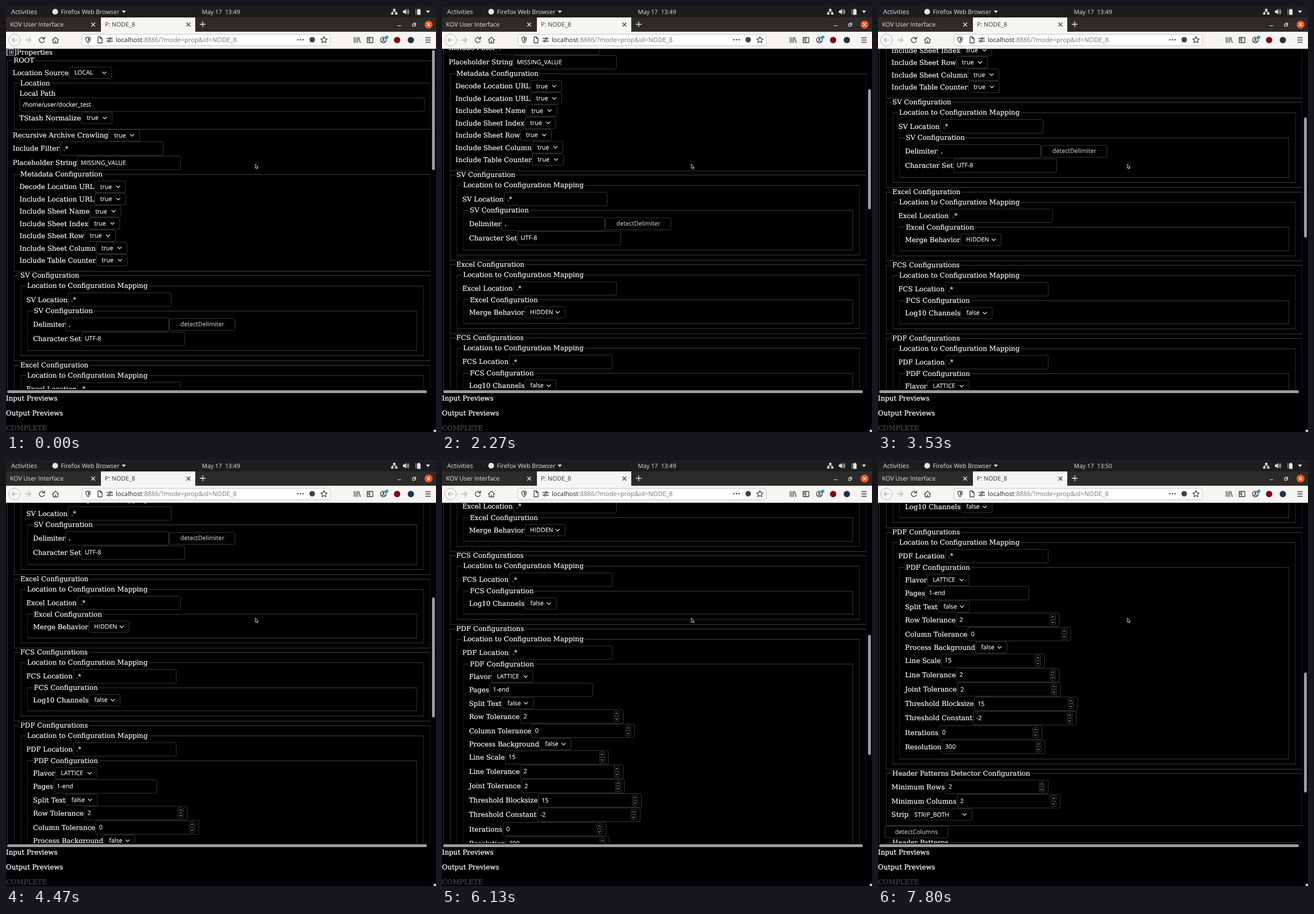
Recreate the animation shown at these times as an HTML page. Size 752 by 745 pixels, loop 8000 ms.

```html
<!DOCTYPE html>
<html lang="en">
<head>
<meta charset="utf-8">
<title>Properties</title>
<style>
  html, body { margin: 0; width: 100%; height: 100%; overflow: hidden; background: #000; }
  #stage { position: relative; width: 752px; height: 745px; overflow: hidden; background: #000;
    color: #fff; font: 11.81px/20px "DejaVu Serif", serif; text-rendering: geometricPrecision; white-space: pre;
    -webkit-text-stroke: .25px; }
  #stage > * { position: absolute; }
  #chrome { left: 0; top: 0; font: 10.65px "Open Sans", sans-serif; }
  #panel { left: 0; top: 75px; width: 752px; height: 595px; overflow: hidden; }
  #page { position: absolute; left: 0; top: -.6px; width: 752px; height: 1600px; will-change: transform; }
  /* The form is laid out at its natural 16px size and shown reduced. */
  #form { width: 1005px; transform: scale(.738); transform-origin: 0 0; font-size: 16px; line-height: 19px; }
  #form * { box-sizing: border-box; }
  fieldset { margin: 0 2px; padding: 5.85px 12px 10px; border: 2px groove #555; }
  legend { padding: 0 2px; }
  .row { display: flex; align-items: center; height: 19px; }
  .row.select { height: 29px; }
  .row.input, .row.number { height: 34px; }
  .row.button { height: 30px; }
  .control { position: relative; display: flex; align-items: center; flex: none; border: 1px solid #4c4c4c;
    border-radius: 4px; background: #000; color: #eee; font: 14.4px "Open Sans", sans-serif; }
  .row > :not(:first-child).control { margin-left: 1px; }
  .control.input, .control.number { height: 33px; padding-left: 7px; }
  .control.select { height: 28px; padding-left: 12px; }
  .control.button { height: 29px; justify-content: center; color: #bbb; }
  .control svg { position: absolute; }
  .select svg { right: 11px; top: 9px; }
  .number svg { right: 7px; top: 2px; }
  .bar { background: #9b9b9b; border-radius: 3px; }
  .tofu { display: inline-block; width: 11px; height: 15px; margin: 0 1px; border: 1px solid #ddd;
    vertical-align: -2px; background: radial-gradient(#999 35%, #222 40%); }
</style>
</head>
<body>
<div id="stage">
  <div id="panel"><div id="page"><div id="form"></div></div></div>
  <div class="bar" id="thumb" style="left:745px;top:77px;width:5px;height:210px"></div>
  <div class="bar" style="left:2px;top:672px;width:734px;height:5px"></div>
  <div style="left:0;top:676px">Input Previews</div>
  <div style="left:0;top:702px">Output Previews</div>
  <div style="left:0;top:728px;color:#434a49">COMPLETE</div>
  <div style="left:748px;top:741px;width:4px;height:4px;background:#ccc"></div>

  <svg id="chrome" width="752" height="75" fill="none" stroke-linecap="round" stroke-linejoin="round">
    <rect width="752" height="20" fill="#1d1d1d"/>
    <rect y="20" width="752" height="26" fill="#2d2a2a"/>
    <rect x="166" y="20" width="165" height="26" fill="#f6f5f4"/>
    <rect y="45" width="752" height="29.5" fill="#f6f5f4"/>
    <rect y="74" width="752" height="1" fill="#c4c2c0"/>

    <g fill="#e6e6e6">
      <text x="9" y="13.8" font-size="11">Activities</text>
      <circle cx="86" cy="10" r="5"/>
      <text x="96" y="13.8">Firefox Web Browser</text>
      <path d="M202.500 8h7l-3.500 4.500zM734.500 8h7l-3.500 4.500z"/>
      <g text-anchor="middle" font-size="10.4">
        <text id="before" x="376" y="13.8">May 17&#160; 13:49</text>
        <text id="after" x="376" y="13.8" opacity="0">May 17&#160; 13:50</text>
      </g>
      <path d="M677 5h4v3.500h-4zM673.500 11.500h4v3.500h-4zM680.500 11.500h4v3.500h-4z"/>
      <path d="M694 8h2.500l3-3v10l-3-3H694z"/>
      <path d="M719 6.500h1.500V5h3v1.500h1.500v9h-6z"/>
      <text x="7" y="36.300">KOV User Interface</text>
    </g>
    <g stroke="#e6e6e6" stroke-width="1.100">
      <path d="M679 8v2M675.500 11.500V10h7v1.500M701 7.500q2 2.500 0 5M703 6q3 4 0 8"/>
      <path d="M717 6v9" stroke-width=".8"/>
      <path d="M149.500 29.500l6 6m0-6l-6 6M339.500 32h9m-4.500-4.500v9" stroke-width="1.300"/>
      <path d="M685.500 34.500h5M711 31.500h4v4h-4zM712.500 30h4v4"/>
    </g>
    <text x="173" y="36.300" fill="#333">P: NODE_8</text>
    <path d="M316 29.500l6 6m0-6l-6 6" stroke="#444" stroke-width="1.300"/>
    <circle cx="739" cy="32.500" r="7" fill="#e95420"/>
    <path d="M736.500 30l5 5m0-5l-5 5" stroke="#fff" stroke-width="1.200"/>

    <g stroke="#b5b3b1" stroke-width="1.300">
      <circle cx="15" cy="59.500" r="10" fill="#fafafa" stroke-width="1"/>
      <path d="M19.500 59.500h-9m4-4l-4 4 4 4M34.500 59.500h9m-4-4l4 4-4 4"/>
    </g>
    <rect x="133" y="49.500" width="434" height="20" rx="3" fill="#fff" stroke="#c9c6c3"/>
    <g stroke="#444" stroke-width="1.300">
      <path d="M66.500 57a4.500 4.500 0 1 0 .5 4M67.500 54v3.500H64"/>
      <path d="M81 59.500l5.500-5 5.500 5M82.500 59.500v5h8v-5M86.500 64v-3"/>
      <path d="M139.500 55.500q2.500 0 4-1.500 1.500 1.500 4 1.500 0 6.500-4 9-4-2.500-4-9z"/>
      <path d="M143.500 56.500v5.500q2-1.500 2-5z" fill="#444" stroke-width=".6"/>
      <path d="M161 54h4l3 3v7.500h-7zM165 54v3h3"/>
      <path d="M176 57h4.500M184 57h2.500M176 61.500h2M182 61.500h4.500"/>
      <circle cx="182.300" cy="57" r="1.500"/><circle cx="180" cy="61.500" r="1.500"/>
      <path d="M556 53.500l1.700 3.700 4 .4-3 2.700.9 4-3.600-2.100-3.600 2.100.9-4-3-2.700 4-.4z"/>
      <path d="M609 55v9M612 55v9M615 55v9M617 55l2.500 9"/>
      <path d="M631.500 55h10v9h-10zM636 55v9M633 57.500h1.500M633 60h1.500"/>
      <circle cx="660" cy="59.500" r="5"/>
      <path d="M657 62.500q3-3 6 0" stroke-width="1.600"/>
      <path d="M734 55.500h8M734 59.500h8M734 63.500h8"/>
    </g>
    <g fill="#444">
      <circle cx="510.500" cy="59" r="1.300"/><circle cx="515" cy="59" r="1.300"/><circle cx="519.500" cy="59" r="1.300"/>
      <circle cx="535.500" cy="59" r="4.800"/>
      <circle cx="660" cy="58" r="1.800"/>
    </g>
    <circle cx="666" cy="54.500" r="2.700" fill="#1a9be6"/>
    <circle cx="684" cy="59.500" r="5.500" fill="#800010"/>
    <circle cx="708" cy="59.500" r="5.500" fill="#24313d"/>
    <text x="192" y="63.200" font-size="11.100" fill="#777"><tspan fill="#1c1c1c">localhost</tspan>:8886/?mode=prop&amp;id=NODE_8</text>
  </svg>

  <svg style="left:434px;top:275px" width="8" height="12">
    <path d="M2 1.500v7.500l1.800-1.600 1.200 2.400 1.200-.6-1.100-2.300h2z" fill="#000" stroke="#ddd" stroke-width=".9"/>
  </svg>
</div>

<script>
const $ = id => document.getElementById(id);

const chevron = `<svg width="12" height="9" viewBox="0 0 9 6.500"><path d="M1 1l3.500 3.500 3.500-3.500" fill="none" stroke="#ddd" stroke-width="1.300"/></svg>`;
const spinner = `<svg width="15" height="27" viewBox="0 0 11 20" fill="none" stroke="#444">
  <rect x=".5" y=".5" width="9.500" height="9" rx="3"/><rect x=".5" y="10" width="9.500" height="9" rx="3"/>
  <path d="M3 6l2.200-2.200 2.200 2.200M3 13.500l2.200 2.200 2.200-2.200" stroke="#ddd"/></svg>`;

function control(kind, value, width) {
  const extra = { select: chevron, number: spinner }[kind] || '';
  return `<span class="control ${kind}" style="width:${width}px">${value}${extra}</span>`;
}

const row = (kind, ...parts) => `<div class="row ${kind}">${parts.join('')}</div>`;
const label = text => `<span>${text}</span>`;
const select = (name, value, width) => row('select', label(name), control('select', value, width));
const yes = name => select(name, 'true', 74);
const no = name => select(name, 'false', 75);
const input = (name, value, tail = '') => row('input', label(name), control('input', value, 245), tail);
const number = (name, value) => row('number', label(name), control('number', value, 245));
const button = (name, width) => control('button', name, width);

const fieldset = (title, ...items) => `<fieldset><legend>${title}</legend>${items.join('')}</fieldset>`;
const mapping = (name, title, ...items) => fieldset(title,
  fieldset('Location to Configuration Mapping',
    input(name + ' Location', '.*'),
    fieldset(name + ' Configuration', ...items)));

$('form').innerHTML = row('', label('[<i class="tofu"></i>]Properties')) + fieldset('ROOT',
  select('Location Source', 'LOCAL', 102),
  fieldset('Location',
    row('', label('Local Path')),
    row('input', control('input', '/home/user/docker_test', 960)),
    yes('TStash Normalize')),
  yes('Recursive Archive Crawling'),
  input('Include Filter', '.*'),
  input('Placeholder String', 'MISSING_VALUE'),
  fieldset('Metadata Configuration', ...['Decode Location URL', 'Include Location URL', 'Include Sheet Name',
    'Include Sheet Index', 'Include Sheet Row', 'Include Sheet Column', 'Include Table Counter'].map(yes)),
  mapping('SV', 'SV Configuration',
    input('Delimiter', ',', button('detectDelimiter', 156)),
    input('Character Set', 'UTF-8')),
  mapping('Excel', 'Excel Configuration', select('Merge Behavior', 'HIDDEN', 96)),
  mapping('FCS', 'FCS Configurations', no('Log10 Channels')),
  mapping('PDF', 'PDF Configurations',
    select('Flavor', 'LATTICE', 99), input('Pages', '1-end'), no('Split Text'),
    number('Row Tolerance', 2), number('Column Tolerance', 0), no('Process Background'),
    number('Line Scale', 15), number('Line Tolerance', 2), number('Joint Tolerance', 2),
    number('Threshold Blocksize', 15), number('Threshold Constant', -2),
    number('Iterations', 0), number('Resolution', 300)),
  fieldset('Header Patterns Detector Configuration',
    number('Minimum Rows', 2), number('Minimum Columns', 2), select('Strip', 'STRIP_BOTH', 150)),
  row('button', button('detectColumns', 150)),
  fieldset('Header Patterns', input('Pattern', '.*')));

// Wheel notches: the tick (1/15 s) each one starts on and how it eases over the next ticks.
const LOOP = 8000, NOTCH = 42.1, THUMB_RATIO = 0.3885;
const EASE = {
  quick: [.2, .75, 1],
  even: [.06, .42, .83, 1],
  late: [.02, .19, .67, 1],
  early: [.18, .67, .98, 1],
  long: [.02, .15, .55, .9, 1],
};
const notches = [
  [9, 'quick'], [14, 'even'], [20, 'long'], [27, 'even'], [33, 'late'], [40, 'even'],
  [46, 'even'], [52, 'late'], [60, 'quick'], [65, 'early'], [71, 'even'], [77, 'even'],
  [85, 'quick'], [90, 'quick'], [96, 'quick'], [102, 'even'], [108, 'even'], [114, 'even'],
];
const tickTime = tick => Math.round(tick * 20 / 3) * 10;

const scroll = [[0, 0]];
notches.forEach(([tick, ease], i) => EASE[ease].forEach((part, k) =>
  scroll.push([tickTime(tick + k), Math.round((i + part) * NOTCH)])));

function play(el, steps, frame) {
  const held = [...steps, [LOOP, steps.at(-1)[1]]];
  el.animate(held.map(([time, value]) => ({ ...frame(value), offset: time / LOOP, easing: 'steps(1, end)' })),
    { duration: LOOP, iterations: Infinity });
}

const shift = y => ({ transform: `translateY(${y}px)` });
play($('page'), scroll, y => shift(-y));
play($('thumb'), scroll, y => shift(y * THUMB_RATIO));
const minute = tickTime(109);
play($('before'), [[0, 1], [minute, 0]], opacity => ({ opacity }));
play($('after'), [[0, 0], [minute, 1]], opacity => ({ opacity }));
</script>
</body>
</html>
```
